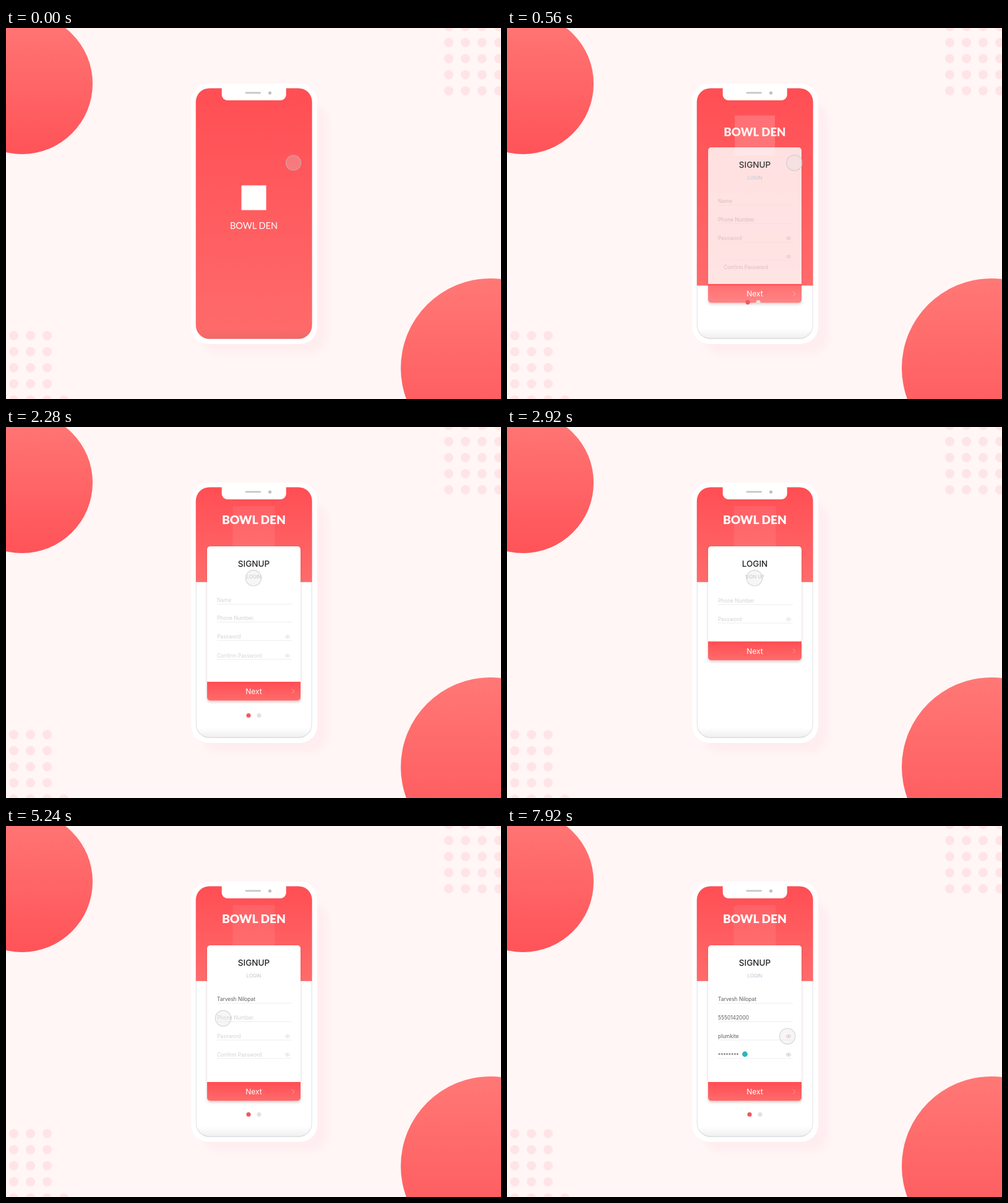
An HTML page that plays this animation: 800 by 600 pixels, repeating every 8000 ms.

```html
<!DOCTYPE html>
<html lang="en">
<head>
<meta charset="utf-8">
<title>Sign-up flow</title>
<style>
  html, body { margin: 0; width: 100%; height: 100%; overflow: hidden; background: #fff6f5; }
  svg { display: block; width: 100%; height: 100%; font-family: Inter, "Open Sans", sans-serif; }
  .brand { font-family: Lato, "Open Sans", sans-serif; fill: #fff; text-anchor: middle; }
  .title { font-size: 13.5px; font-weight: 500; fill: #222; text-anchor: middle; }
  .sub { font-size: 7.6px; fill: #b5c2d0; text-anchor: middle; }
  .hint { font-size: 8.3px; fill: #d2d2d2; }
  .typed { font-size: 8.4px; fill: #5c5c5c; }
  .rule { stroke: #ededed; }
  .eye { fill: none; stroke-width: .7; }
</style>
</head>
<body>
<svg viewBox="0 0 800 600">
  <defs>
    <linearGradient id="red" x2="0" y2="1">
      <stop stop-color="#ff4e54"/><stop offset="1" stop-color="#ff6b6b"/>
    </linearGradient>
    <linearGradient id="ball" x2="0" y2="1">
      <stop stop-color="#ff7876"/><stop offset="1" stop-color="#ff5358"/>
    </linearGradient>
    <linearGradient id="floor" x2="0" y2="1">
      <stop stop-color="#555" stop-opacity="0"/><stop offset="1" stop-color="#555" stop-opacity=".1"/>
    </linearGradient>
    <filter id="soft" x="-20%" y="-20%" width="140%" height="140%"><feGaussianBlur stdDeviation="5"/></filter>
    <filter id="near" x="-20%" y="-20%" width="140%" height="140%"><feGaussianBlur stdDeviation="2"/></filter>
    <clipPath id="screen"><rect x="306.8" y="97.4" width="187.8" height="405.4" rx="22"/></clipPath>
  </defs>

  <rect width="800" height="600" fill="#fff6f5"/>
  <g id="spots" fill="#ffe4e6"></g>
  <circle cx="26" cy="90" r="114" fill="url(#ball)"/>
  <circle cx="783" cy="550" r="145" fill="url(#ball)"/>

  <rect x="317" y="122" width="202" height="405" rx="28" fill="#ffeef0" filter="url(#soft)"/>
  <rect x="299" y="90" width="204" height="421" rx="28" fill="#fff"/>

  <g clip-path="url(#screen)">
    <rect x="306" y="97" width="190" height="407" fill="#fff"/>
    <rect x="306.8" y="97.4" width="187.8" height="405.4" rx="22" fill="none" stroke="#dcdfe2" stroke-width="2"/>
    <rect id="header" x="306" y="97" width="190" fill="url(#red)"/>
    <rect x="306" y="486" width="190" height="17" fill="url(#floor)"/>
    <rect id="mark" fill="#fff"/>
    <g id="brand">
      <text id="thin" class="brand" font-size="14.5">BOWL DEN</text>
      <text id="bold" class="brand" font-size="14.5" font-weight="900">BOWL DEN</text>
    </g>

    <g id="card">
      <rect id="shade" x="325" y="195" width="151" rx="5" fill="#8a5a5e" opacity=".3" filter="url(#near)"/>
      <rect id="paper" x="325" y="193" width="151" rx="5" fill="#fff"/>
      <g id="fields"></g>
      <g id="button">
        <path d="M325 414h151v25.5a5 5 0 0 1-5 5h-141a5 5 0 0 1-5-5z" fill="url(#red)"/>
        <text x="400.5" y="434" font-size="12" fill="#fff" text-anchor="middle">Next</text>
        <path d="M462.3 426l3.5 3.6-3.5 3.6" fill="none" stroke="#fff" stroke-opacity=".55" stroke-width=".8"/>
      </g>
    </g>
    <g id="signup">
      <text class="title" x="400.5" y="226">SIGNUP</text>
      <text class="sub" x="400.5" y="245.4">LOGIN</text>
    </g>
    <g id="login">
      <text class="title" x="400.5" y="226">LOGIN</text>
      <text class="sub" x="400.5" y="245.4">SIGN UP</text>
    </g>
    <g id="pager">
      <circle cx="392" cy="466.5" r="3.6" fill="#f4565d"/>
      <circle cx="409" cy="466.5" r="3.6" fill="#e2e2e2"/>
    </g>
    <circle id="check" cx="384.5" cy="369" r="4.4" fill="#2fb4b6"/>
  </g>

  <path d="M348.7 96h104v12a9 9 0 0 1-9 9h-86a9 9 0 0 1-9-9z" fill="#fff"/>
  <rect x="386.5" y="103.4" width="25.5" height="2.8" rx="1.4" fill="#c6c6c6"/>
  <circle cx="426.5" cy="105" r="2.6" fill="#c0c0c0"/>
  <circle id="touch" fill="#dcdcdc" fill-opacity=".27" stroke="#c2c2c2" stroke-opacity=".6" stroke-width="1.2"/>
</svg>

<script>
const LOOP = 8000;
const $ = id => document.getElementById(id);
const clamp = x => Math.min(1, Math.max(0, x));
const lerp = (a, b, p) => a + (b - a) * p;
const span = (t, from, to) => clamp((t - from) / (to - from));
const ease = x => x < .5 ? 4 * x ** 3 : 1 - 4 * (1 - x) ** 3;
const glide = (t, from, to) => ease(span(t, from, to));

function add(parent, tag, attrs, text) {
  const el = document.createElementNS('http://www.w3.org/2000/svg', tag);
  set(el, attrs);
  if (text) el.textContent = text;
  parent.appendChild(el);
  return el;
}
function set(el, attrs) {
  for (const key in attrs) el.setAttribute(key, attrs[key]);
}

// Corner dot grids
function spot(x, y) { add($('spots'), 'circle', { cx: x, cy: y, r: 7.5 }); }
for (let row = 0; row < 5; row++) {
  for (let col = 0; col < 4; col++) {
    spot(715.5 + 27 * col, -2.5 + 26 * row);
    if (col < 3 || row === 4) spot(12.5 + 27 * col, 497.5 + 26 * row);
  }
}

// Form rows: label, typed value, typing interval
const rows = [
  { hint: 'Name', value: 'Tarvesh Nilopat', from: 4400, to: 4960 },
  { hint: 'Phone Number.', value: '5550142000', from: 5300, to: 5700, stays: true },
  { hint: 'Password', value: '********', from: 5960, to: 6280, stays: true, eye: true },
  { hint: 'Confirm Password', value: '********', from: 6560, to: 6880, eye: true }
];
rows.forEach((row, i) => {
  const y = 283.4 + 29.8 * i;
  row.g = add($('fields'), 'g', {});
  row.line = add(row.g, 'path', { class: 'rule', d: `M341 ${y + 3.1}h121` });
  row.label = add(row.g, 'text', { class: 'hint', x: 341, y }, row.hint);
  row.text = add(row.g, 'text', { class: 'typed', x: 341, y: row.eye ? y + .8 : y });
  if (row.eye) {
    row.look = add(row.g, 'g', { class: 'eye', transform: `translate(455 ${y - 3})` });
    add(row.look, 'path', { d: 'M-4 0Q0-5 4 0Q0 5-4 0z' });
    add(row.look, 'circle', { r: 1.1 });
  }
});
const plain = add(rows[2].g, 'text', { class: 'typed', x: 341, y: 343 }, 'plumkite');

// Pointer moves: start, end, destination
const home = [464.5, 218];
const moves = [
  [1360, 1820, 400, 244.3],
  [3605, 4405, 351, 281],
  [4980, 5240, 351, 311],
  [5700, 5940, 353, 340],
  [6300, 6540, 353, 368.5],
  [6940, 7480, 453.3, 340]
];
const taps = [0, 1940, 7540];

function pointer(t) {
  let [x, y] = home;
  for (const [from, to, nx, ny] of moves) {
    const p = glide(t, from, to);
    x = lerp(x, nx, p);
    y = lerp(y, ny, p);
  }
  const press = Math.max(...taps.map(at => 1 - span(Math.abs(t - at), 0, 60)));
  set($('touch'), { cx: x, cy: y, r: 12.7 - .6 * press });
}

function intro(t) {
  const rise = glide(t, 0, 800);
  const late = glide(t, 340, 840);
  const size = lerp(40, 68, rise);
  set($('header'), { height: lerp(407, 153.8, late) });
  set($('mark'), {
    x: 400.5 - size / 2, y: lerp(274.5, 162, rise) - size / 2,
    width: size, height: size, opacity: lerp(1, .08, rise)
  });
  const zoom = lerp(1, 19.2 / 14.5, rise);
  set($('brand'), { transform: `translate(400.5 ${lerp(325.3, 157, rise)}) scale(${zoom})` });
  set($('thin'), { opacity: 1 - rise });
  set($('bold'), { opacity: rise });
  set($('card'), { opacity: span(t, 60, 670) });
  return { rise, late };
}

function form(t, late, swap) {
  rows.forEach((row, i) => {
    const count = Math.floor(span(t, row.from, row.to) * row.value.length);
    const dx = i === 3 ? 13.6 * (1 - late) : 0;
    const dy = i === 3 ? 27 * (1 - late) : 0;
    row.text.textContent = row.value.slice(0, count);
    set(row.label, { transform: `translate(${dx} ${dy})`, opacity: count ? 0 : 1 });
    set(row.line, { opacity: late });
    set(row.g, {
      transform: `translate(0 ${row.stays ? -29 * swap : 0})`,
      opacity: row.stays ? 1 : clamp(1 - swap * 1.5)
    });
    if (row.eye) set(row.look, { stroke: count ? '#b2b2b2' : '#d4d4d4' });
  });
  rows[1].label.textContent = swap > .5 ? 'Phone Number' : 'Phone Number.';

  const shown = span(t, 7580, 7900);
  set(rows[2].text, { opacity: 1 - shown });
  set(plain, { opacity: shown });
  if (shown > 0) set(rows[2].look, { stroke: '#ee8d92' });
  set($('check'), { opacity: span(t, 6880, 6960) });
}

function render(t) {
  const { rise, late } = intro(t);
  const swap = glide(t, 2130, 2890) - glide(t, 3280, 4000);
  const lift = 67.3 * swap;
  set($('paper'), { height: 251.5 - lift });
  set($('shade'), { height: 252 - lift });
  set($('button'), { transform: `translate(0 ${-lift})` });
  set($('signup'), { opacity: rise * (1 - swap) });
  set($('login'), { opacity: swap });
  set($('pager'), {
    transform: `translate(${-4.5 * (1 - late)} ${-35 * (1 - late)})`,
    opacity: span(t, 300, 520) * (1 - swap)
  });
  form(t, late, swap);
  pointer(t);
}

const start = performance.now();
function tick() {
  render((performance.now() - start) % LOOP);
  requestAnimationFrame(tick);
}
tick();
</script>
</body>
</html>
```
